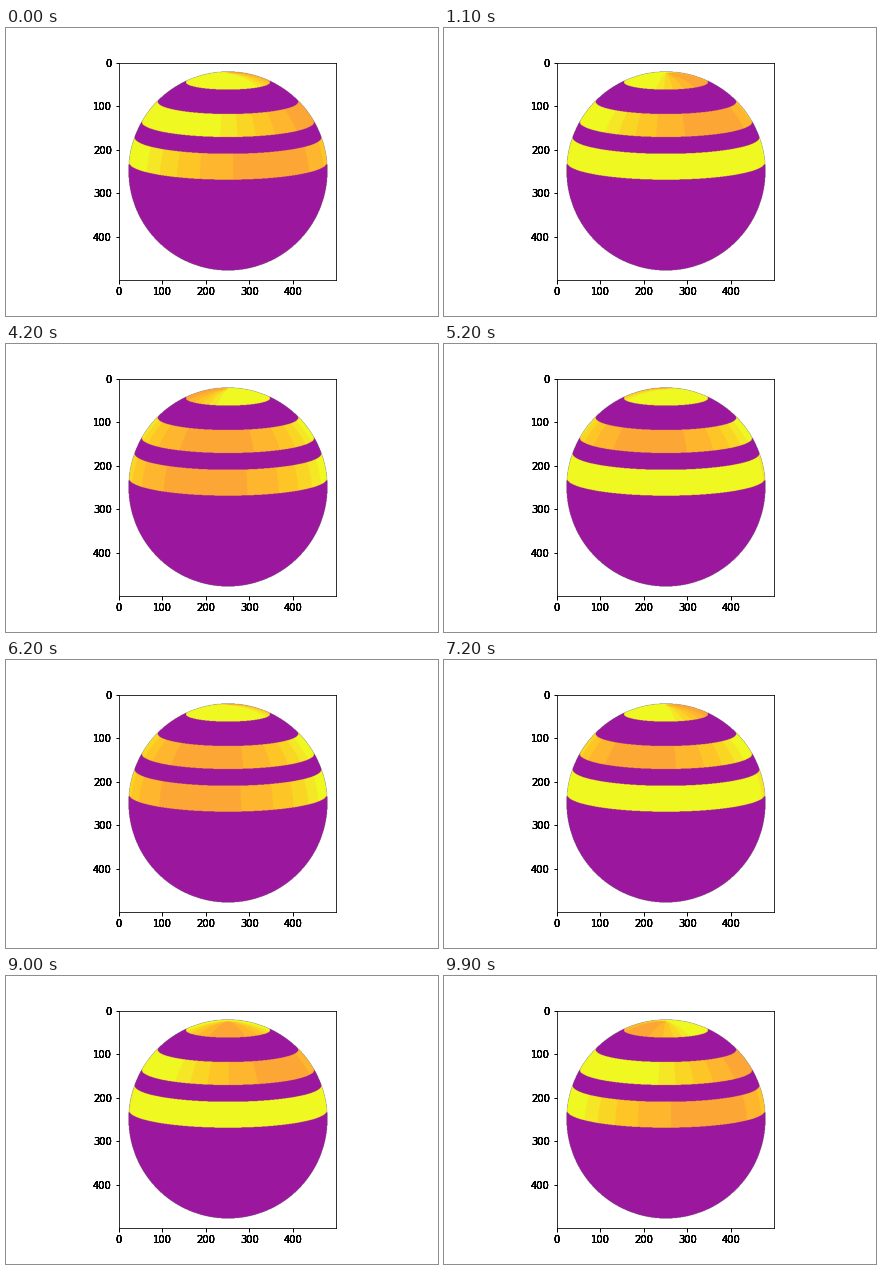
These frames come from a looping animation (432x288 px, 10 s). A matplotlib script:

```python
import numpy as np
import matplotlib.pyplot as plt
from matplotlib.animation import FuncAnimation

FRAMES = 100
SIZE, RADIUS = 500, 228
TILT = np.radians(10)
LEVELS = 5
# (south edge, north edge, start longitude, turns per loop), angles in degrees
BANDS = [(65, 90, 130, 1.5), (30, 45, 79, 10), (5, 20, 29, 5)]

plasma = plt.get_cmap("plasma")
shades = plasma(np.linspace(1.0, 0.8, LEVELS + 1), bytes=True)

# Orthographic sphere with its pole tipped towards the viewer
row, col = np.mgrid[:SIZE, :SIZE]
x = (col + 0.5 - SIZE / 2) / RADIUS
y = (SIZE / 2 - row - 0.5) / RADIUS
inside = x**2 + y**2 <= 1
z = np.sqrt(np.clip(1 - x**2 - y**2, 0, 1))
up = y * np.cos(TILT) + z * np.sin(TILT)
front = z * np.cos(TILT) - y * np.sin(TILT)
lat = np.degrees(np.arcsin(np.clip(up, -1, 1)))
lon = np.arctan2(x, front)

base = np.zeros((SIZE, SIZE, 4), np.uint8)
base[inside] = plasma(1 / 3, bytes=True)
masks = [inside & (lat >= south) & (lat <= north) for south, north, _, _ in BANDS]
lons = [lon[mask] for mask in masks]


def render(i):
    image = base.copy()
    for (_, _, start, turns), mask, angle in zip(BANDS, masks, lons):
        centre = np.radians(start) - 2 * np.pi * turns * i / (FRAMES - 1)
        dim = np.clip(np.cos(angle - centre), 0, 1)
        image[mask] = shades[np.rint(dim * LEVELS).astype(int)]
    return image


fig = plt.figure(figsize=(6, 4), dpi=72, facecolor="white")
fig.subplots_adjust(left=0.125, right=0.9, bottom=0.125, top=0.88)
ax = fig.add_subplot()
picture = ax.imshow(render(0))

ticks = range(0, SIZE, 100)
ax.set_xticks(ticks)
ax.set_yticks(ticks)
ax.tick_params(labelbottom=False, labelleft=False, width=1)

# Stacked labels give the heavy, hard-edged digits
x_trans, x_va, x_ha = ax.get_xaxis_text1_transform(7)
y_trans, y_va, y_ha = ax.get_yaxis_text1_transform(7)
for _ in range(6):
    for v in ticks:
        ax.text(v, 0, str(v), transform=x_trans, va=x_va, ha=x_ha, fontsize=10)
        ax.text(0, v, str(v), transform=y_trans, va=y_va, ha=y_ha, fontsize=10)


def update(i):
    picture.set_data(render(i))
    return [picture]


anim = FuncAnimation(fig, update, frames=FRAMES, interval=100, repeat=True,
                     repeat_delay=0, blit=False)
plt.show()
```
